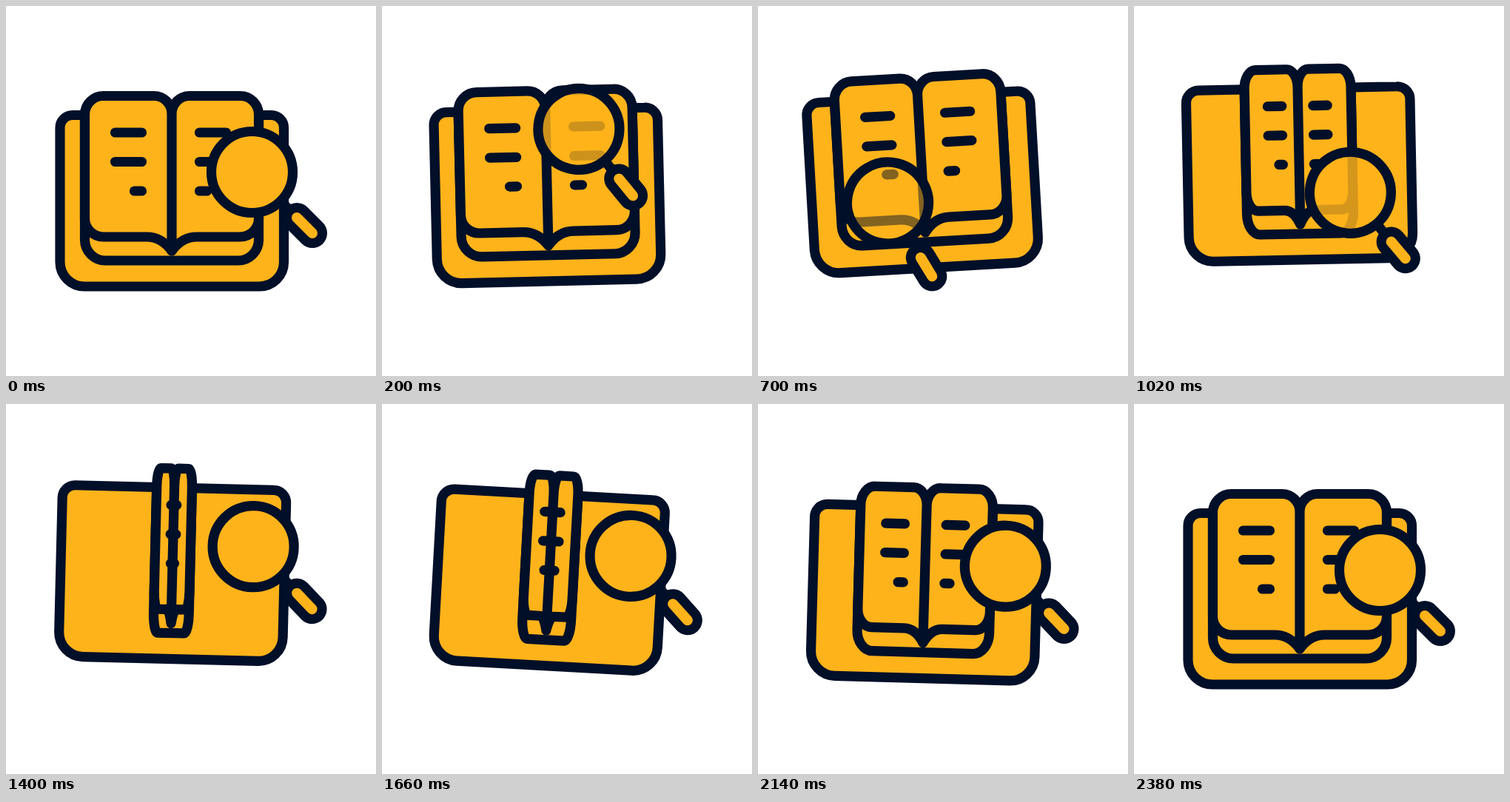
An HTML page for the animation above (2400 ms loop, 500 by 500 pixels).

```html
<!DOCTYPE html>
<html lang="en">
<head>
<meta charset="utf-8">
<title>Book search</title>
<style>
  html, body { margin: 0; width: 100%; height: 100%; overflow: hidden; background: #fff; }
  svg { display: block; width: 100%; height: 100%; }
  #scene { fill: #ffb31a; stroke: #010f28; stroke-width: 13.2; stroke-linecap: round; stroke-linejoin: round; }
</style>
</head>
<body>
<svg viewBox="0 0 500 500">
  <g id="scene">
    <path d="M73 165A17 17 0 0 1 90 147.5H358A17 17 0 0 1 375.5 165V346A33 33 0 0 1 342 379H106A33 33 0 0 1 73 346Z"/>
    <path id="backing"/>
    <path id="pages"/>
    <path id="lines"/>
    <g id="glass">
      <path d="M39 39L60 61"/>
      <path d="M60.5 61.5L81.5 82.5" stroke-width="40"/>
      <path d="M60.5 61.5L81.5 82.5" stroke="#ffb31a" stroke-width="14"/>
      <circle id="lens" r="55"/>
    </g>
  </g>
</svg>
<script>
const LOOP = 2400, STEP = 20, LAST = 119, SPINE = 224;
const $ = id => document.getElementById(id);
const set = (id, name, value) => $(id).setAttribute(name, value);
const clamp = v => Math.max(0, Math.min(1, v));

// Closed loop that the lens follows during the first half
const route = [[332.5, 224.5], [255, 172], [181, 218], [178, 291], [268, 307]];

function lensPosition(u) {
  const n = route.length, at = clamp(u) * n, i = Math.floor(at), f = at - i;
  const [a, b, c, d] = [-1, 0, 1, 2].map(k => route[(i + k + n) % n]);
  return [0, 1].map(k => b[k] + f / 2 * (c[k] - a[k]
    + f * (2 * a[k] - 5 * b[k] + 4 * c[k] - d[k]
    + f * (3 * (b[k] - c[k]) + d[k] - a[k]))));
}

function backingPath(s) {
  const l = SPINE - 117.5 * s, r = SPINE + 117.5 * s, rx = 28 * s;
  return `M${l} 147V316A${rx} 28 0 0 0 ${l + rx} 344H${r - rx}A${rx} 28 0 0 0 ${r} 316V147Z`;
}

function pagePath(side, s) {
  const x = offset => SPINE + side * offset * s;
  const arc = (r, offset, y) => `A${r * s} ${r} 0 0 ${side < 0 ? 1 : 0} ${x(offset)} ${y}`;
  return `M${x(117.5)} 146.5${arc(25, 92.5, 121.5)}H${x(24)}${arc(24, 0, 145.5)}V331`
    + `C${x(8)} 320 ${x(19)} 312 ${x(34)} 312H${x(92.5)}${arc(25, 117.5, 287)}Z`;
}

function linesPath(open) {
  const line = (y, from, to) => `M${SPINE + from * open} ${y}H${SPINE + to * open}`;
  return [171, 210.5].map(y => line(y, -76.5, -40.5) + line(y, 37.5, 73.5)).join("")
    + line(250, -50.5, -40.5) + line(250, 37.5, 47.5);
}

function draw(now) {
  const step = Math.floor(now % LOOP / STEP), p = step / LAST;

  const lift = 42 * (1 - Math.abs(1 - 2 * p));
  const sway = p < .25 ? 4 * p : p < .75 ? 2 - 4 * p : 4 * p - 4;
  set("scene", "transform", `translate(0 ${-lift}) rotate(${-4 * sway} 220 292)`);

  const open = step < 75 ? clamp((72 - step) / 39) : clamp((step - 77) / 42);
  const spread = .16 + .84 * open;
  set("backing", "d", backingPath(spread));
  set("pages", "d", pagePath(-1, spread) + pagePath(1, spread));
  set("lines", "d", linesPath(open));

  const search = clamp(1 - Math.abs(1 - 4 * p));
  set("glass", "transform", `translate(${lensPosition(2 * p)}) rotate(${20.5 * search})`);
  set("lens", "fill-opacity", 1 - .59 * search);

  requestAnimationFrame(draw);
}
requestAnimationFrame(draw);
</script>
</body>
</html>
```
